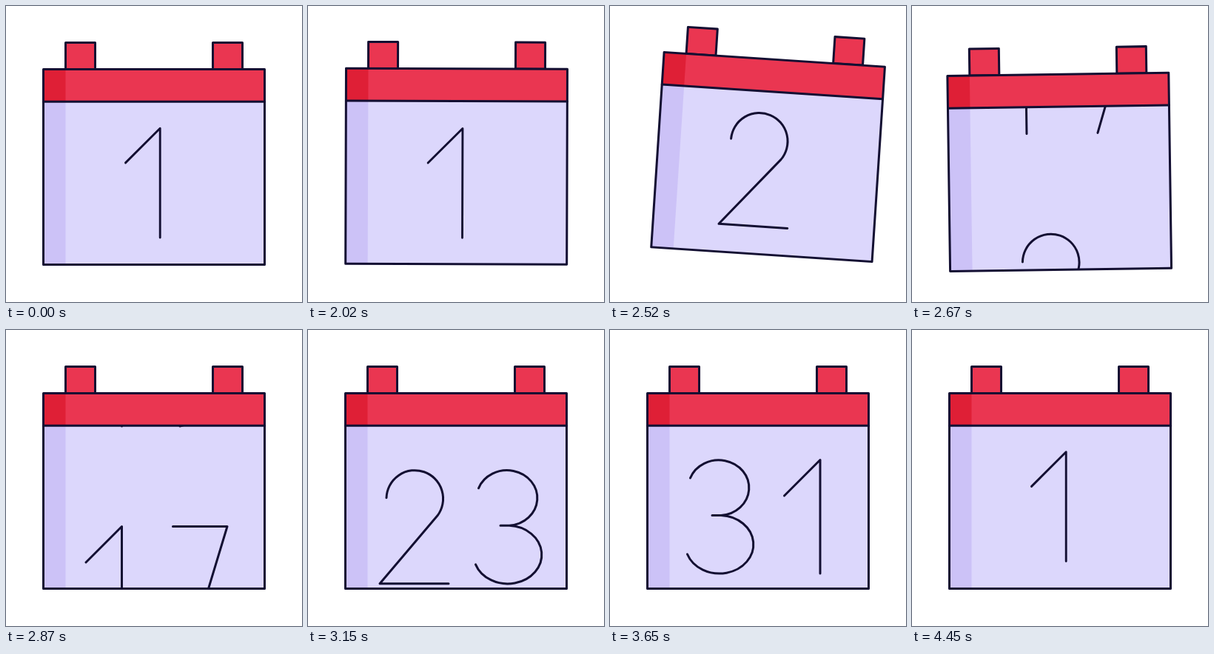
Write an HTML page with a canvas that moves like this. It is 400x400 px and loops after 4470 ms.

```html
<!DOCTYPE html>
<html lang="en">
<head>
<meta charset="utf-8">
<title>Calendar</title>
<style>
html, body { margin: 0; width: 100%; height: 100%; overflow: hidden; background: #fff; }
canvas { display: block; width: 400px; height: 400px; }
</style>
</head>
<body>
<canvas id="stage" width="400" height="400"></canvas>
<script>
const ctx = document.getElementById('stage').getContext('2d');
const LOOP = 4470;
const PITCH = 289;
const BASELINE = 313;
const INK = '#130f32', RED = '#ea3651', DARK_RED = '#df1f36', PAPER = '#dcd7fc', SHADE = '#ccc2f7';
const CENTER = { x: 200, y: 217.75 };

// Digit strokes, with the origin at the lower left.
const GLYPHS = {
  1: 'M0 -105L48.5 -153.5V0',
  2: 'M9 -116A38.3 38.3 0 1 1 78 -92L0 0H93',
  3: 'M4.5 -129A41 37.4 0 1 1 46 -78.5H34M46 -78.5A46 39.3 0 1 1 .5 -26',
  6: 'M0 -49C0 -109 27 -144 70 -154M0 -45a43.5 45 0 1 1 87 0a43.5 45 0 1 1 -87 0',
  7: 'M0 -153.5H73.5L27 0',
  9: 'M87 -105C87 -45 60 -10 17 0M0 -109a43.5 45 0 1 1 87 0a43.5 45 0 1 1 -87 0'
};
for (const digit in GLYPHS) GLYPHS[digit] = new Path2D(GLYPHS[digit]);

// Each page of the strip: [digit, left edge, scale].
const ONE = [[1, 161.5, 0.963]];
const PAGES = [
  ONE,
  [[2, 139.5]],
  [[1, 108], [7, 225.5]],
  [[1, 108], [9, 218]],
  [[2, 97], [3, 226]],
  [[2, 97], [6, 227.5]],
  [[2, 97], [9, 227.5]],
  [[3, 104], [1, 235.5]],
  ONE
];

// Keys: [time, value, speed per ms].
const SCROLL = [
  [1995, 0], [2520, 288, 0.85], [2870, 684, 1.5], [3400, 1662, 1.75],
  [3650, 2039, 1.2], [4170, 2322], [4450, 2311.5], [4470, 2312]
];
const swing = (peak, rebound) => [[1985, 0], [2365, peak], [2715, rebound], [2865, 0]];
const TILT = swing(7.3, -1.2);
const SHIFT_X = swing(24.6, -2);
const SHIFT_Y = swing(-29.1, 8.5);

function valueAt(keys, t) {
  if (t <= keys[0][0]) return keys[0][1];
  const next = keys.findIndex(key => key[0] > t);
  if (next < 0) return keys[keys.length - 1][1];
  const [t0, v0, s0 = 0] = keys[next - 1];
  const [t1, v1, s1 = 0] = keys[next];
  const span = t1 - t0, p = (t - t0) / span, q = 1 - p;
  return v0 * q * q * (1 + 2 * p) + v1 * p * p * (3 - 2 * p)
    + span * p * q * (s0 * q - s1 * p);
}

function fill(color, x, y, w, h) {
  ctx.fillStyle = color;
  ctx.fillRect(x, y, w, h);
}

function drawPages(travel) {
  ctx.save();
  ctx.beginPath();
  ctx.rect(50.5, 129, 299, 220.5);
  ctx.clip();
  PAGES.forEach((page, i) => {
    const y = BASELINE + travel - i * PITCH;
    if (y < 120 || y > 515) return;
    for (const [digit, x, scale = 1] of page) {
      ctx.save();
      ctx.translate(x, y);
      ctx.scale(scale, scale);
      ctx.stroke(GLYPHS[digit]);
      ctx.restore();
    }
  });
  ctx.restore();
}

function drawCalendar(travel) {
  ctx.strokeStyle = INK;
  ctx.lineWidth = 3;
  ctx.lineCap = ctx.lineJoin = 'round';

  fill(PAPER, 50.5, 129, 299, 220.5);
  fill(SHADE, 50.5, 129, 30, 220.5);
  drawPages(travel);

  for (const x of [80.5, 279.5]) {
    fill(RED, x, 49.5, 40, 36);
    ctx.strokeRect(x, 49.5, 40, 36);
  }
  fill(RED, 50.5, 85.5, 299, 43.5);
  fill(DARK_RED, 50.5, 85.5, 30, 43.5);
  ctx.strokeRect(50.5, 85.5, 299, 264);
  ctx.beginPath();
  ctx.moveTo(50.5, 129.2);
  ctx.lineTo(349.5, 129.2);
  ctx.stroke();
}

function render(t) {
  fill('#fff', 0, 0, 400, 400);
  ctx.save();
  ctx.translate(CENTER.x + valueAt(SHIFT_X, t), CENTER.y + valueAt(SHIFT_Y, t));
  ctx.rotate(valueAt(TILT, t) * Math.PI / 180);
  ctx.translate(-CENTER.x, -CENTER.y);
  drawCalendar(valueAt(SCROLL, t));
  ctx.restore();
}

let start;
function tick(now) {
  start ??= now;
  render((now - start) % LOOP);
  requestAnimationFrame(tick);
}
render(0);
requestAnimationFrame(tick);
</script>
</body>
</html>
```
